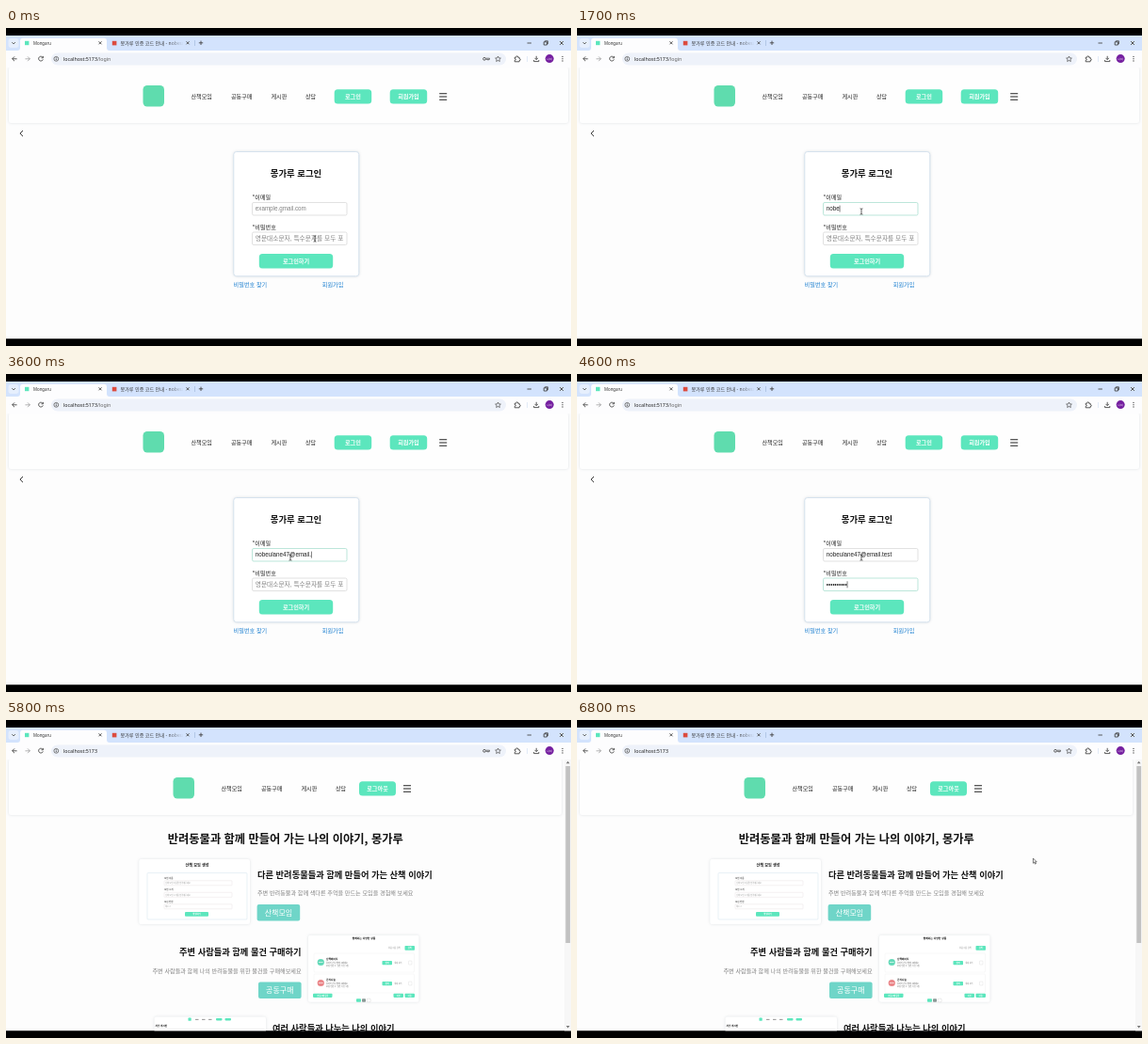
Recreate the animation shown at these times as an HTML page. Size 600 by 338 pixels, loop 6.9 s.

```html
<!DOCTYPE html>
<html lang="ko">
<head>
<meta charset="utf-8">
<title>Login demo</title>
<style>
  html, body { margin: 0; width: 100%; height: 100%; overflow: hidden; background: #000; }
  svg { display: block; width: 600px; height: 338px; }
  text { font-family: "Noto Sans CJK KR", "Noto Sans CJK", "Noto Sans", sans-serif; white-space: pre; }
  .ui { font-family: "Noto Sans", "Noto Sans CJK KR", sans-serif; }
  .field { font-family: "Liberation Sans", "Noto Sans CJK KR", sans-serif; }
  .icon { fill: none; stroke: #474747; stroke-width: .9; }
  .card { filter: drop-shadow(0 .8px 1.6px rgba(60, 80, 100, .16)); }
</style>
</head>
<body>
<svg id="stage" viewBox="0 0 600 338" xmlns="http://www.w3.org/2000/svg"></svg>
<script>
const LOOP = 6900, STEP = 100;
const TOP = 8, BOTTOM = 330.5;
const EMAIL = 'nobeulane47@email.test';
const MINT = '#5ce6bd', TEAL = '#6fd5c8';

const rect = (x, y, w, h, fill, r = 0, more = '') =>
  `<rect x="${x}" y="${y}" width="${w}" height="${h}" rx="${r}" fill="${fill}" ${more}/>`;
const circle = (x, y, r, fill, more = '') =>
  `<circle cx="${x}" cy="${y}" r="${r}" fill="${fill}" ${more}/>`;
const icon = (d, more = '') => `<path class="icon" d="${d}" ${more}/>`;
const text = (x, y, size, str, fill = '#222', more = '') =>
  `<text x="${x}" y="${y}" font-size="${size}" fill="${fill}" ${more}>${str}</text>`;
const bold = 'font-weight="700"', mid = 'text-anchor="middle"', end = 'text-anchor="end"';
const cross = (x, y, r) => icon(`M${x - r} ${y - r}l${2 * r} ${2 * r}m0 ${-2 * r}l${-2 * r} ${2 * r}`);
const button = (x, y, w, h, label, size = 6.15, fill = MINT, r = 3.5, weight = bold) =>
  rect(x, y, w, h, fill, r) + text(x + w / 2, y + h / 2 + size * .36, size, label, '#fff', mid + ' ' + weight);

function browser() {
  return rect(0, TOP, 600, 17, '#d3e3fd') +
    rect(2.5, 11, 11, 10, '#e6effd', 3) + icon('M6.4 15.2l1.7 1.7 1.7-1.7') +
    `<path d="M12 24q3 0 3-3v-7.3q0-3 3-3h86q3 0 3 3v7.3q0 3 3 3z" fill="#fdfdfe"/>` +
    rect(20, 13.8, 4.4, 4.4, MINT) + text(29, 18, 4.4, 'Mongaru', '#333', 'class="ui"') +
    cross(100, 15.8, 1.5) +
    rect(112.8, 13.8, 4.6, 4.6, '#dc4b3e') +
    text(121.5, 18.1, 5.1, '몽가루 인증 코드 안내 - nobeu', 'url(#fade)') +
    cross(193, 15.8, 1.5) + rect(200, 13, .6, 6, '#9db4d8') +
    icon('M204.8 15.8h4.4m-2.2-2.2v4.4') +
    icon('M553.5 16h4.4M571.2 14.8h3.2v3.2h-3.2zM572.3 14.8v-1h3.1v3.1h-1') + cross(590, 16, 1.9) +
    rect(0, 24, 600, 18, '#fdfdfe') + rect(48, 26.5, 483, 13, '#eef2fa', 6.5) +
    icon('M11.6 32.8H6.7m2.3-2.4l-2.4 2.4 2.4 2.4') +
    icon('M20.4 32.8h4.9m-2.3-2.4l2.4 2.4-2.4 2.4', 'opacity=".45"') +
    icon('M39.1 31.4a2.4 2.4 0 1 0 .2 2M39.4 29.9v1.9h-1.9') +
    circle(53.3, 32.8, 2.4, 'none', 'stroke="#474747" stroke-width=".7"') +
    icon('M53.3 32.4v1.7m0-2.9v.6') +
    `<text class="ui" x="61" y="34.8" font-size="5.3" fill="#222">localhost:5173<tspan id="path" fill="#666">/login</tspan></text>` +
    `<g id="key">${circle(508, 32.8, 1.4, 'none', 'stroke="#474747" stroke-width=".8"')}${icon('M509.5 32.2h4v1.2h-4m2.5 0v1.1', 'style="stroke-width:.7"')}</g>` +
    icon('M522.5 30l.9 1.9 2 .2-1.5 1.4.4 2-1.8-1-1.8 1 .4-2-1.5-1.4 2-.2z', 'style="stroke-width:.7"') +
    icon('M540.2 31.2h1.5q0-1.4 1-1.4t1 1.4h1.4v1.4q1.2 0 1.2 1t-1.2 1v1.2h-4.9v-1.5q1.2-.1 1.2-.9t-1.2-.9z') +
    rect(553, 30, .5, 6, '#c7d6ee') +
    icon('M563.2 29.8v3.7m-1.7-1.6l1.7 1.7 1.7-1.7M560.6 34v1.6h5.2V34') +
    circle(577.2, 32.6, 4.5, '#751fa0') + text(577.2, 33.7, 2.8, '나비', '#fff', mid) +
    [30.4, 32.7, 35].map(y => circle(591, y, .65, '#444')).join('');
}

// The menu bar is the same on both pages, shifted sideways.
function menu(dx, width, buttons) {
  const items = [[196.5, '산책모임'], [239, '공동구매'], [281.5, '게시판'], [318, '상담']];
  return rect(3, 41.5, width, 59.5, '#fefefe', 2, 'class="card"') +
    `<g transform="translate(${dx})">` + rect(145.5, 61, 22.5, 22.5, '#5fdcae', 4.5) +
    items.map(([x, s]) => text(x, 75.2, 6.1, s)).join('') + '</g>' + buttons;
}
const burger = x => icon(`M${x} 69.7h8m-8 3.3h8m-8 3.3h8`, 'style="stroke:#222;stroke-width:1.1"');

function loginPage() {
  const box = (id, y) => `<rect id="${id}" x="261.5" y="${y}" width="100.5" height="13.5" rx="1.5" fill="#fff" stroke-width=".7"/>`;
  return menu(0, 594, button(348.7, 65.2, 39.5, 15.4, '로그인') + button(407.7, 65.2, 39.5, 15.4, '회원가입') + burger(460.2)) +
    icon('M18 109l-3.1 3.1 3.1 3.1', 'style="stroke:#333;stroke-width:1"') +
    rect(241.8, 131.5, 133, 132.3, '#fff', 3, 'stroke="#d3e0ec" stroke-width=".9" class="card"') +
    text(308, 158, 9.4, '몽가루 로그인', '#111', mid + ' ' + bold) +
    text(261.5, 182.2, 6.1, '*이메일', '#222', 'font-weight="500"') + box('mailBox', 185.5) +
    text(261.5, 214, 6.1, '*비밀번호', '#222', 'font-weight="500"') + box('passBox', 217) +
    '<g clip-path="url(#clip)">' +
    text(264.8, 194.4, 6.27, '', '#222', 'id="mail" class="field"') +
    text(264.8, 226.2, 6.7, '', '#222', 'id="pass" class="field"') + '</g>' +
    '<path id="caret" stroke="#222" stroke-width=".6"/>' +
    button(268.8, 240, 78.4, 15.6, '로그인하기') +
    text(241.6, 275, 6.15, '비밀번호 찾기', '#1b7fd0') + text(335.8, 275, 6.15, '회원가입', '#1b7fd0');
}

function walkCard() {
  const rows = [['모임 이름', '산책 모임 이름을 입력해주세요'], ['모임 소개', '산책 모임 소개를 입력해주세요'], ['모집 인원', '최소 2']];
  return rect(141.3, 148, 117.7, 69, '#fff', 2, 'class="card"') +
    text(203, 156, 4.1, '산책 모임 생성', '#111', mid + ' ' + bold) +
    rect(150, 162.5, 106, 49.5, '#fff', 1, 'stroke="#d9e8f0" stroke-width=".6"') +
    rows.map(([label, hint], i) => {
      const y = 168.8 + i * 12.5;
      return text(168, y, 2.4, label, '#222') +
        rect(168, y + 2, 72, 5, '#fff', .5, 'stroke="#e4dcdf" stroke-width=".4"') +
        text(169.2, y + 5.4, 2.1, hint, '#999');
    }).join('') + button(190, 204, 25, 4.8, '생성하기', 2.3, MINT, 1);
}

function shopCard() {
  const small = (x, y, w, h, label) => button(x, y, w, h, label, 2.1, MINT, .8);
  const row = (y, fill, name) =>
    rect(327, y, 106.5, 20, '#fff', 1, 'stroke="#eee" stroke-width=".4"') +
    circle(334.3, y + 9.5, 3.6, fill) + rect(332, y + 9, 4.6, .9, '#fff', 0, 'opacity=".7"') +
    text(340, y + 7.4, 2.7, name, '#111', bold) +
    text(340, y + 11, 2.1, '강아지 간식 함께 구매해요', '#666') +
    text(340, y + 14.4, 2.1, '모집 인원 4 · 남은 기간 3일', '#666') +
    small(399.5, y + 8, 10.5, 4.2, '참여') +
    text(412.5, y + 10.9, 2, '상세 보기', '#777') +
    rect(427.5, y + 8, 3.5, 4, '#fff', .8, 'stroke="#ccc" stroke-width=".3"');
  return rect(321, 228.8, 117.5, 71, '#fff', 2, 'class="card"') +
    text(380, 233, 2.8, '함께하는 다양한 상품', '#111', mid + ' ' + bold) +
    text(406, 243.2, 2.1, '상품 이름 검색', '#888') + small(423.5, 240, 10.5, 4.8, '검색') +
    row(248, '#62d9b8', '산책메이트') + row(270, '#ea8588', '간식나눔') +
    small(326, 290.7, 20.5, 4.2, '공동구매 등록') +
    small(411.5, 290.7, 10.5, 4.2, '이전') + small(423.5, 290.7, 10.5, 4.2, '다음') +
    rect(372, 296.2, 5, 3.6, MINT, .8) + rect(378, 296.2, 4, 3.6, '#8b9997', .8) +
    rect(383.2, 296.2, 4, 3.6, '#fff', .8, 'stroke="#bbb" stroke-width=".3"');
}

function homePage() {
  const HEAD = 9.25, NOTE = 6.12;
  return menu(32, 587, button(375, 65.2, 39, 15.4, '로그아웃') + burger(422)) +
    text(296.8, 131.2, 12.25, '반려동물과 함께 만들어 가는 나의 이야기, 몽가루', '#111', mid + ' ' + bold) +
    walkCard() +
    text(267, 168.2, HEAD, '다른 반려동물들과 함께 만들어 가는 산책 이야기', '#111', bold) +
    text(267, 186.2, NOTE, '주변 반려동물과 함께 색다른 추억을 만드는 모임을 경험해 보세요', '#808080') +
    button(266.6, 196, 45.6, 17.6, '산책모임', 8, TEAL, 2, '') +
    shopCard() +
    text(313.6, 250.4, HEAD, '주변 사람들과 함께 물건 구매하기', '#111', end + ' ' + bold) +
    text(313.6, 268.5, NOTE, '주변 사람들과 함께 나의 반려동물을 위한 물건을 구매해보세요', '#808080', end) +
    button(268, 278.4, 45.6, 17.6, '공동구매', 8, TEAL, 2, '') +
    rect(157.5, 315.5, 118.5, 30, '#fff', 2, 'class="card"') +
    rect(193.5, 316.6, 3.2, 3.2, MINT, .6) +
    [201, 208, 215].map(x => rect(x, 317.9, 3.5, .7, '#666')).join('') +
    rect(223, 317, 6.5, 2.4, MINT, .8) + rect(232.5, 317, 6.5, 2.4, MINT, .8) +
    text(158.5, 325.8, 2.6, '자유 게시판', '#111', bold) +
    rect(158.5, 328.5, 116, .4, '#ddd') +
    text(283, 330.8, HEAD, '여러 사람들과 나누는 나의 이야기', '#111', bold) +
    rect(593, 42, 7, 289, '#f7f7f7') + rect(594.3, 49, 4.8, 188, '#c2c2c2') +
    '<path d="M594.8 46.2l1.9-2.4 1.9 2.4z" fill="#777"/><path d="M594.8 325l1.9 2.4 1.9-2.4z" fill="#777"/>';
}

const pointers = {
  beam: icon('M-1.4-3.2q1.4 0 1.4.8v4.8q0 .8 1.4.8M1.4-3.2Q0-3.2 0-2.4M0 2.4q0 .8-1.4.8', 'style="stroke:#222;stroke-width:.7"'),
  hand: '<path d="M-.8-3.2q.7-.6 1.2 0v2.3l2.4.6q.7.3.6 1.2l-.6 2.8h-3.4l-2-2.8q0-.9.8-.6l1 .7z" fill="#fff" stroke="#222" stroke-width=".6"/>',
  arrow: '<path d="M-.6-3v5.2l1.2-1.1.9 2 .9-.4-.9-1.9h1.7z" fill="#fff" stroke="#222" stroke-width=".6"/>'
};

document.getElementById('stage').innerHTML =
  `<defs><linearGradient id="fade" gradientUnits="userSpaceOnUse" x1="172" x2="187">
     <stop stop-color="#333"/><stop offset="1" stop-color="#333" stop-opacity=".1"/></linearGradient>
   <clipPath id="clip"><rect x="262" y="185" width="97.5" height="48"/></clipPath></defs>` +
  rect(0, 0, 600, 338, '#000') + rect(0, TOP, 600, BOTTOM - TOP, '#fdfdfd') +
  `<g id="login">${loginPage()}</g><g id="home">${homePage()}</g>` + browser() +
  '<g id="mouse"></g>' + rect(0, BOTTOM, 600, 338 - BOTTOM, '#000');

const el = {};
for (const id of ['login', 'home', 'path', 'key', 'mailBox', 'passBox', 'mail', 'pass', 'caret', 'mouse'])
  el[id] = document.getElementById(id);
const show = (node, on) => node.setAttribute('display', on ? 'inline' : 'none');

// Rows: time, then values.
const MOUSE = [[0, 328, 224], [300, 302, 195], [5000, 302, 195], [5400, 306, 248], [5900, 306, 248], [6500, 485, 150]];
const TYPED = [[1100, 0], [1200, 1], [2400, 10], [3600, 18], [4000, EMAIL.length]];
const DOTS = [[4050, 0], [4700, 12]];

function at(rows, t, ease = u => u) {
  if (t <= rows[0][0]) return rows[0].slice(1);
  const i = rows.findIndex(r => r[0] > t);
  if (i < 0) return rows[rows.length - 1].slice(1);
  const a = rows[i - 1], b = rows[i], u = ease((t - a[0]) / (b[0] - a[0]));
  return a.slice(1).map((v, k) => v + (b[k + 1] - v) * u);
}
const smooth = u => u * u * (3 - 2 * u);

function fill(node, value, hint) {
  node.textContent = value || hint;
  node.setAttribute('fill', value ? '#222' : '#808080');
}

function draw(t) {
  const home = t >= 5700;
  show(el.login, !home);
  show(el.home, home);
  el.path.textContent = home ? '' : '/login';
  show(el.key, t < 1200 || t >= 4800);

  const typed = EMAIL.slice(0, Math.floor(at(TYPED, t)[0] + 1e-6));
  const dots = '•'.repeat(Math.floor(at(DOTS, t)[0] + 1e-6));
  fill(el.mail, typed, 'example.gmail.com');
  fill(el.pass, dots, '영문대소문자, 특수문자를 모두 포');
  el.pass.setAttribute('font-size', dots ? 6.27 : 6.7);

  const onMail = t >= 600 && t < 4100, onPass = t >= 4100 && t < 5500;
  el.mailBox.setAttribute('stroke', onMail ? '#9fdccb' : '#d4d4d4');
  el.passBox.setAttribute('stroke', onPass ? '#9fdccb' : '#d4d4d4');
  show(el.caret, (onMail && (t < 1100 || typed)) || (onPass && t < 5200));
  const node = onPass ? el.pass : el.mail, value = onPass ? dots : typed;
  const x = 265.1 + (value && !home ? node.getComputedTextLength() : 0);
  el.caret.setAttribute('d', `M${x} ${onPass ? 220.3 : 188.6}v7`);

  const [mx, my] = at(MOUSE, t, smooth);
  const kind = home || (my > 200 && my < 216 && t > 5000) ? 'arrow' : my > 239 ? 'hand' : 'beam';
  el.mouse.innerHTML = pointers[kind];
  el.mouse.setAttribute('transform', `translate(${mx} ${my})`);
  show(el.mouse, !home || t > 5900);
}

const start = performance.now();
let last = -1;
function tick() {
  const t = Math.floor((performance.now() - start) % LOOP / STEP) * STEP;
  if (t !== last) draw(last = t);
  requestAnimationFrame(tick);
}
tick();
</script>
</body>
</html>
```
